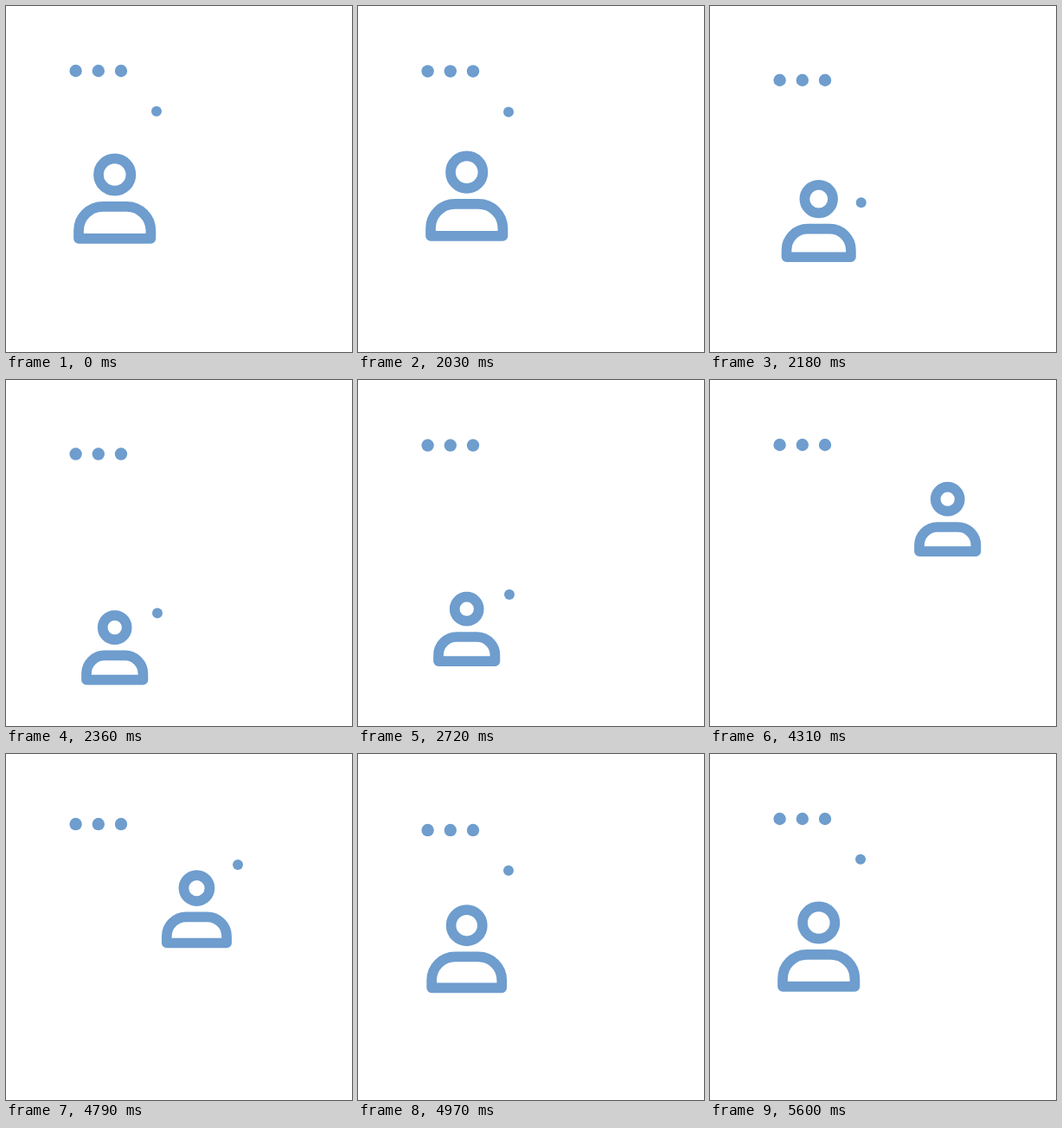
An HTML page for the animation above (5.63 s loop, 400x400 px).

```html
<!DOCTYPE html>
<html lang="en">
<head>
<meta charset="utf-8">
<title>Person and dots</title>
<style>
  html, body { margin: 0; width: 100%; height: 100%; overflow: hidden; background: #fff; }
  svg { display: block; width: 100vw; height: 100vh; }
</style>
</head>
<body>
<svg viewBox="0 0 400 400">
  <g id="dots" fill="#6e9dce">
    <circle cx="80.6" cy="75" r="7.2"/>
    <circle cx="106.8" cy="75" r="7.2"/>
    <circle cx="133" cy="75" r="7.2"/>
  </g>
  <circle id="spot" r="6" fill="#6e9dce"/>
  <g id="person" fill="none" stroke="#6e9dce" stroke-width="11.7" stroke-linejoin="round">
    <circle id="head"/>
    <path id="body"/>
  </g>
</svg>
<script>
const LOOP = 5630, START = 2000, STEP = 30;
const DROP = 0, MOVE = 57, BACK = 89; // first step of each move

const $ = id => document.getElementById(id);
const mix = (a, b, k) => a + (b - a) * k;
const wave = u => (1 - Math.cos(Math.PI * u)) / 2;
const rise = u => Math.sin(Math.PI * u / 2);

// keys: [step, value, easing into this key]
function track(n, keys) {
  if (n <= keys[0][0]) return keys[0][1];
  for (let i = 1; i < keys.length; i++) {
    const [a, from] = keys[i - 1], [b, to, ease = wave] = keys[i];
    if (n < b) return mix(from, to, ease((n - a) / (b - a)));
  }
  return keys[keys.length - 1][1];
}

const from = (start, ...keys) => keys.map(([n, ...rest]) => [n + start, ...rest]);
const longBob = start => from(start, [0, 0], [8.6, 13.6], [19, 1], [30, 0]);

const bob = [...longBob(DROP), ...from(MOVE, [0, 0], [7.5, 13.4], [15, 0]), ...longBob(BACK)];
const small = [...from(DROP, [2, 0], [10, 1]), ...from(BACK, [0, 1], [13, 0])];
const personX = [...from(MOVE, [0, 125.7], [15, 274.7]), ...from(BACK, [0, 274.7], [9.7, 125.7])];
const personY = [
  ...from(DROP, [0, 195], [4, 187.5, rise], [9, 290.5], [20, 265.2], [30, 263.7]),
  ...from(MOVE, [0, 263.7], [15, 137.7]),
  ...from(BACK, [0, 137.7], [11.3, 200.2], [31, 195])
];
const spotX = [
  ...from(DROP, [0, 174], [9, 175]),
  ...from(MOVE, [0, 175], [15, 325]),
  ...from(BACK, [0, 325], [9.5, 174])
];
const spotY = [
  ...from(DROP, [0, 121.7], [1, 122.4], [9, 274], [20, 248.5], [30, 247]),
  ...from(MOVE, [0, 247], [15, 122]),
  ...from(BACK, [0, 122], [9.5, 121.7])
];
const hidden = [[38, 44], [54, 67], [77, 84]];

function draw(ms) {
  const n = Math.max(0, Math.floor((ms - START) / STEP));
  const lift = track(n, bob), k = track(n, small);
  const x = track(n, personX), y = track(n, personY);

  $('dots').setAttribute('transform', `translate(0 ${lift})`);

  const spot = $('spot');
  spot.setAttribute('cx', track(n, spotX));
  spot.setAttribute('cy', track(n, spotY) + (n >= MOVE ? lift : 0));
  spot.setAttribute('visibility', hidden.some(([a, b]) => n >= a && n < b) ? 'hidden' : 'visible');

  $('person').setAttribute('transform', `translate(${x} ${y})`);
  $('head').setAttribute('r', mix(18.7, 14, k));
  const w = mix(41.7, 32.7, k), top = mix(36.8, 32.3, k);
  const low = mix(73.8, 60.5, k), r = mix(28, 21, k);
  $('body').setAttribute('d',
    `M${-w} ${low}V${top + r}A${r} ${r} 0 0 1 ${r - w} ${top}` +
    `H${w - r}A${r} ${r} 0 0 1 ${w} ${top + r}V${low}Z`);
}

const begin = performance.now();
function tick() {
  draw((performance.now() - begin) % LOOP);
  requestAnimationFrame(tick);
}
tick();
</script>
</body>
</html>
```
